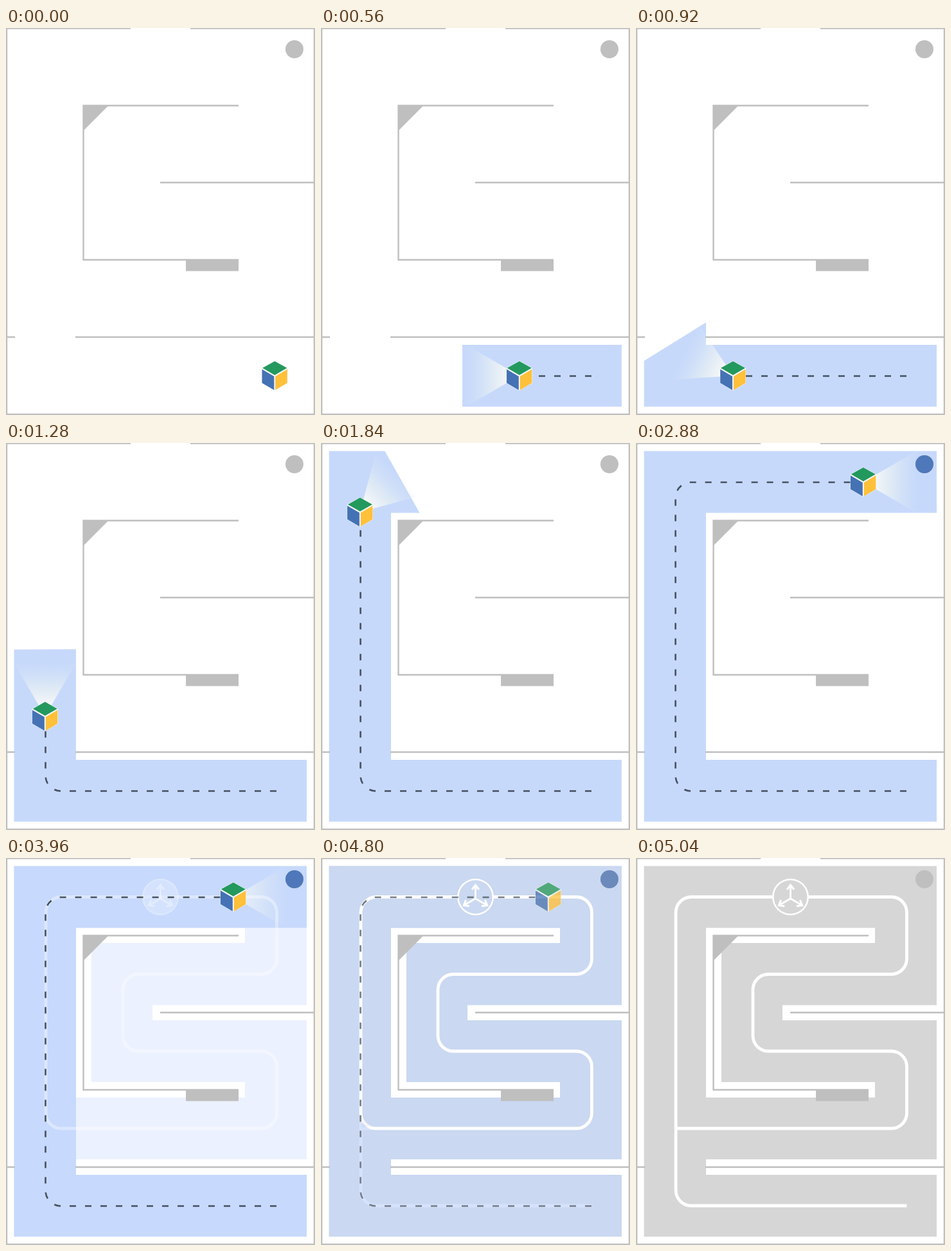
Recreate the animation shown at these times as an HTML page with a canvas. Size 481 by 601 pixels, loop 6.04 s.

```html
<!DOCTYPE html>
<html>
<head>
<meta charset="utf-8">
<style>
  html, body { margin: 0; width: 100%; height: 100%; overflow: hidden; background: #fff; }
  canvas { display: block; }
</style>
</head>
<body>
<canvas id="stage" width="481" height="601"></canvas>
<script>
const ctx = document.getElementById('stage').getContext('2d');
const LOOP = 6040, STEP = 40, DRIVE_STEPS = 72;
const BLUE = '#c7d9fb', FLOOR = '#d6d6d6', WALL = '#bfbfbf';

const clamp = x => Math.max(0, Math.min(1, x));
const smooth = (from, to, x) => { const p = clamp((x - from) / (to - from)); return p * p * (3 - 2 * p); };

// Floor area: everything except the clearance around the walls.
const floorArea = new Path2D(`M12.5 12.5H468V588H12.5Z
  M109 108.5H372V132H133V348H372V372H109Z M228 228.5H468V252H228Z M109 468H468V492H109Z`);
const driveArea = new Path2D('M12.5 12.5H468V108.5H109V492H468V588H12.5Z');
const walls = new Path2D(`M0 .5H194M287 .5H481M1 0V601M480 0V601M0 600H481
  M362 120.5H120.5V360H362M240 240H481M0 480H14M108 480H481`);

// Centre line of the scanned area; its wide curves tilt the scan front.
const scanLine = new Path2D('M468 540H220C132 540 61 441 61 319V220C61 132 160 61 282 61H468');

const drive = 'M421 540.5H85.5A24 24 0 0 1 61.5 516.5V85A24 24 0 0 1 85.5 61H354.5';
const driveLine = new Path2D(drive);
const track = document.createElementNS('http://www.w3.org/2000/svg', 'path');
track.setAttribute('d', drive);
const trackLength = track.getTotalLength();

const serpent = `A24 24 0 0 1 86 60.5H398A24 24 0 0 1 421.5 84.5V156A24 24 0 0 1 397.5 180.5
  H206A24 24 0 0 0 182 204.5V276A24 24 0 0 0 206 300H397.5A24 24 0 0 1 421.5 324V396A24 24 0 0 1 397.5 420`;
const loopRoute = new Path2D(`M62 396V84.5${serpent}H86A24 24 0 0 1 62 396`);
const fullRoute = new Path2D(`M421.5 540H86A24 24 0 0 1 62 516V84.5${serpent}H62`);

function stroke(path, color, width, dash = []) {
  ctx.strokeStyle = color;
  ctx.lineWidth = width;
  ctx.setLineDash(dash);
  ctx.stroke(path);
  ctx.setLineDash([]);
}

function polygon(color, ...points) {
  ctx.fillStyle = color;
  ctx.beginPath();
  points.forEach(([x, y]) => ctx.lineTo(x, y));
  ctx.fill();
}

function disc(x, y, r, color) {
  ctx.fillStyle = color;
  ctx.beginPath();
  ctx.arc(x, y, r, 0, 7);
  ctx.fill();
}

function drawWalls() {
  stroke(walls, WALL, 2.4);
  polygon(WALL, [120, 120], [160, 120], [120, 160]);
  ctx.fillRect(280, 359, 82, 18.5);
  disc(449, 33, 14, WALL);
}

function drawMap(color, route) {
  ctx.fillStyle = color;
  ctx.fill(floorArea, 'evenodd');
  stroke(route, '#fff', 4.8);
  disc(240.5, 60.5, 28.5, '#fff');
  disc(240.5, 60.5, 26, color);
  const arrow = new Path2D('M0 0V-21M-5.5 -14L0 -21L5.5 -14');
  for (let i = 0; i < 3; i++) {
    ctx.save();
    ctx.translate(240.5, 63);
    ctx.rotate(i * Math.PI * 2 / 3);
    stroke(arrow, '#fff', 3);
    ctx.restore();
  }
}

// Length of the scanned strip for a given step.
function scanLength(step) {
  const keys = [[0, 0], [14, 248], [32, 547], [46, 806], [64, 1150]];
  const i = Math.max(1, keys.findIndex(k => k[0] >= step));
  const [[x0, y0], [x1, y1]] = step > 64 ? keys.slice(-2) : [keys[i - 1], keys[i]];
  return y0 + (y1 - y0) * (step - x0) / (x1 - x0);
}

function drawScan(step, x, y) {
  ctx.save();
  ctx.clip(driveArea);
  stroke(scanLine, BLUE, 360, [scanLength(step), 5000]);
  ctx.translate(x, y);
  ctx.rotate((smooth(18, 32, step) + smooth(39, 53, step) - 2) * Math.PI / 2);
  const light = ctx.createLinearGradient(15, 0, 84, 0);
  light.addColorStop(0, 'rgba(248,249,248,1)');
  light.addColorStop(.45, 'rgba(230,239,243,.7)');
  light.addColorStop(1, 'rgba(215,230,245,0)');
  polygon(light, [0, 0], [84, -48.5], [84, 48.5]);
  ctx.restore();
}

function drawCube(x, y) {
  ctx.save();
  ctx.translate(x, y);
  polygon('#f4f6f8', [0, -23], [20, -12], [20, 11.5], [0, 23], [-20, 11.5], [-20, -12]);
  polygon('#23995d', [0, -22.5], [19, -11.8], [0, -1], [-19, -11.8]);
  polygon('#4472b4', [-19.8, -9.8], [-1, 1], [-1, 22.3], [-19.8, 11.3]);
  polygon('#ffc03a', [1, 1], [19.5, -9.8], [19.5, 11.3], [1, 22.3]);
  ctx.restore();
}

function withAlpha(alpha, draw) {
  if (alpha <= 0) return;
  ctx.save();
  ctx.globalAlpha = alpha;
  draw();
  ctx.restore();
}

function clear() {
  ctx.fillStyle = '#fff';
  ctx.fillRect(0, 0, 481, 601);
}

// The finished map is flattened once so it can cross-fade as a whole.
clear();
drawMap(FLOOR, fullRoute);
drawWalls();
const finished = document.createElement('canvas');
finished.width = 481;
finished.height = 601;
finished.getContext('2d').drawImage(ctx.canvas, 0, 0);

function draw(time) {
  const t = Math.floor(time / STEP) * STEP;
  const step = Math.min(DRIVE_STEPS, t / STEP);
  const distance = 2 + (trackLength - 2) * smooth(0, DRIVE_STEPS, step);
  const point = track.getPointAtLength(distance);
  const x = point.x - .7, y = point.y - .6;

  clear();
  if (step > 0) drawScan(step, x, y);
  withAlpha(smooth(3810, 4180, t), () => drawMap(BLUE, loopRoute));
  drawWalls();
  withAlpha(clamp((step - 60) / 8), () => disc(449, 33, 14, '#4f78ba'));

  const dashes = Array(Math.ceil(distance / 24)).fill([10, 14]).flat();
  stroke(driveLine, '#46525f', 2.6, [...dashes, 0, 5000]);
  drawCube(x, y);
  withAlpha(clamp((t - 4720) / 320), () => ctx.drawImage(finished, 0, 0));
}

const start = performance.now();
function tick() {
  draw((performance.now() - start) % LOOP);
  requestAnimationFrame(tick);
}
tick();
</script>
</body>
</html>
```
